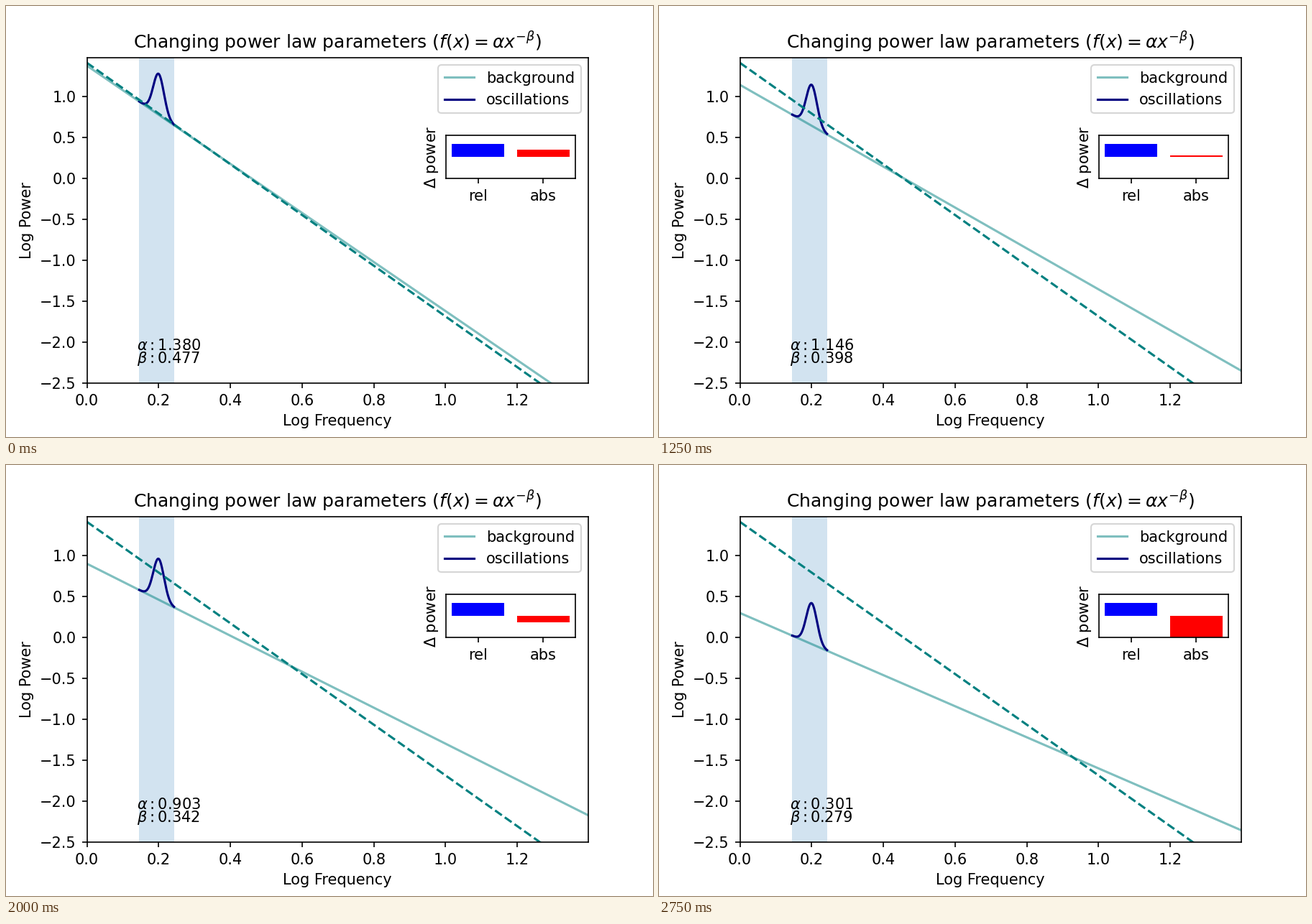
A matplotlib script that plays this animation: 900 by 600 pixels, repeating every 3000 ms.

```python
import numpy as np
import matplotlib.pyplot as plt
from matplotlib.animation import FuncAnimation

FRAMES = 12
CENTER, SIGMA, HEIGHT = 0.2, 0.015, 0.5
REL_POWER, MEAN_BUMP = 0.3, 0.187

plt.rcParams.update({"font.family": "DejaVu Sans", "font.size": 10})

log_f = np.linspace(0, np.log10(25), 200)
band = np.log10([1.4, 1.75])
band_x = np.linspace(*band, 200)
bump = HEIGHT * np.exp(-0.5 * ((band_x - CENTER) / SIGMA) ** 2)


def power_law(x, step):
    """Log power for the given step; step -1 is the fixed reference."""
    return np.log10(24 - 2 * step) - (3 - 0.1 * step) * x


fig, ax = plt.subplots(figsize=(6, 4), dpi=150)
fig.subplots_adjust(left=0.125, right=0.9, bottom=0.125, top=0.88)

ax.axvspan(*band, facecolor="tab:blue", edgecolor="none", alpha=0.2)
background, = ax.plot([], [], color="teal", alpha=0.5, label="background")
oscillations, = ax.plot([], [], color="navy", label="oscillations")
ax.plot(log_f, power_law(log_f, -1), "--", color="teal")
alpha_text = ax.text(0.14, -2.1, "")
beta_text = ax.text(0.14, -2.25, "")

ax.set_xlim(0, np.log10(25))
ax.set_ylim(-2.5, np.log10(30))
ax.set_xlabel("Log Frequency")
ax.set_ylabel("Log Power")
ax.set_title(r"Changing power law parameters ($f(x) = \alpha x^{-\beta}$)")
ax.legend(loc="upper right")

inset = fig.add_axes([0.68, 0.6, 0.2, 0.1])
rel_bar, abs_bar = inset.bar([0, 1], [REL_POWER, 0], color=["blue", "red"])
inset.set_xlim(-0.49, 1.49)
inset.set_ylim(-0.5, 0.5)
inset.set_xticks([0, 1], ["rel", "abs"])
inset.set_yticks([])
inset.set_ylabel(r"$\Delta$ power")


def update(step):
    background.set_data(log_f, power_law(log_f, step))
    oscillations.set_data(band_x, power_law(band_x, step) + bump)
    shift = np.mean(power_law(band_x, step) - power_law(band_x, -1))
    abs_bar.set_height(shift + MEAN_BUMP)
    alpha_text.set_text(rf"$\alpha: {np.log10(24 - 2 * step):.3f}$")
    beta_text.set_text(rf"$\beta: {np.log10(3 - 0.1 * step):.3f}$")
    return background, oscillations, abs_bar, alpha_text, beta_text


anim = FuncAnimation(fig, update, frames=FRAMES, interval=250,
                     repeat=True, repeat_delay=0)
plt.show()
```
